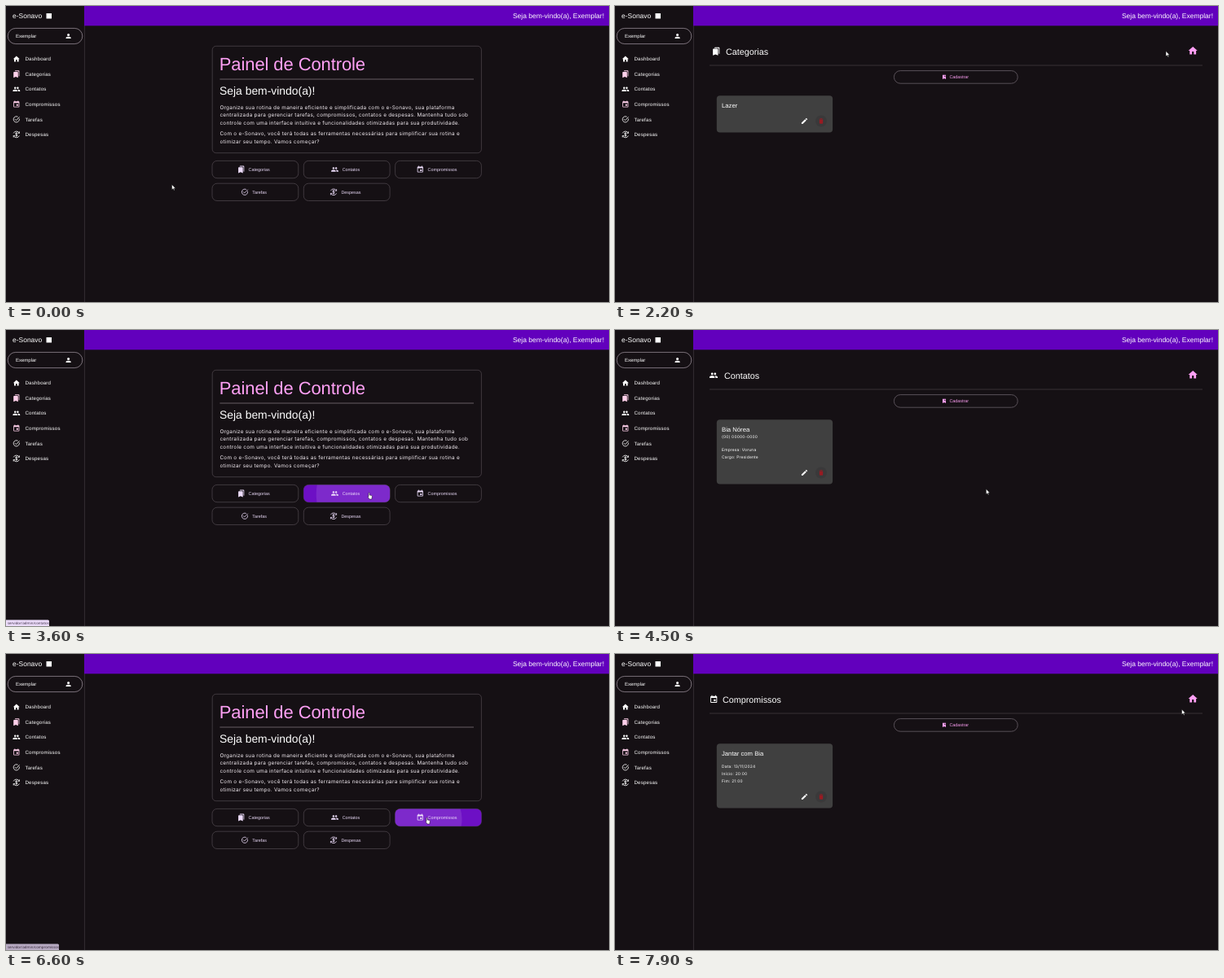
These frames come from a looping animation (740x364 px, 8 s). An HTML page:

```html
<!DOCTYPE html>
<html lang="pt-BR">
<head>
<meta charset="utf-8">
<title>Painel de Controle</title>
<style>
  html, body { margin: 0; width: 100%; height: 100%; overflow: hidden; background: #151014; }
  svg { display: block; width: 100vw; height: 100vh; }
  text { font-family: "Liberation Sans", Arial, sans-serif; text-rendering: geometricPrecision; white-space: pre; }
  .body { font-family: Inter, sans-serif; letter-spacing: .041em; }
  .menu { letter-spacing: .19px; }
  .tight { letter-spacing: -.1px; }
  .url { font-family: "Open Sans", sans-serif; }
</style>
</head>
<body>
<svg id="stage" viewBox="0 0 740 364"></svg>
<script>
const LOOP = 8000;
const WHITE = '#fff', PINK = '#ffa0f5', PALE = '#ffe0f7', LILAC = '#ecdcfa', EDGE = '#4b434a';

const ICONS = {
  home: '<path d="M10 20v-6h4v6h5v-8h3L12 3 2 12h3v8z"/>',
  books: '<path d="M19 18l2 1V3q0-2-2-2H9Q7 1 7 3h10q2 0 2 2zM15 5H5Q3 5 3 7v16l7-3 7 3V7q0-2-2-2z"/>',
  people: '<circle cx="8" cy="8" r="3"/><circle cx="16" cy="8" r="3"/>' +
    '<path d="M1 19v-2.5C1 14 6 13 8 13s7 1 7 3.500V19zM17 19v-2.500q0-2-2-3.400c3-.4 8 1 8 3.400V19z"/>',
  event: '<path fill-rule="evenodd" d="M19 3h-1V1h-2v2H8V1H6v2H5Q3 3 3 5v14q0 2 2 2h14q2 0 2-2V5q0-2-2-2zm0 16H5V8h14zm-2-7h-5v5h5z"/>',
  task: '<path fill="none" stroke="currentColor" stroke-width="2" d="M20.600 9.500A9 9 0 1 1 16.500 4.200M7 11l4 4L21.500 4.500"/>',
  money: '<path fill="none" stroke="currentColor" stroke-width="2" d="M3 8A10 10 0 0 1 21 8M21 3v5h-5M21 16A10 10 0 0 1 3 16M3 21v-5h5' +
    'M15 9q-1-1.500-3-1.500c-4 0-4 4 0 4.500s4 4.500 0 4.500q-2 0-3-1.500M12 5.500v13"/>',
  person: '<circle cx="12" cy="8" r="4"/><path d="M4 20v-2c0-3 5-4 8-4s8 1 8 4v2z"/>',
  pencil: '<path d="M3 17.200V21h3.800L17.800 9.900 14 6.200zM20.700 7a1 1 0 0 0 0-1.400l-2.300-2.300a1 1 0 0 0-1.400 0l-1.900 1.800 3.800 3.800z"/>',
  trash: '<path d="M6 19q0 2 2 2h8q2 0 2-2V7H6zM19 4h-3.500l-1-1h-5l-1 1H5v2h14z"/>',
  add: '<path fill-rule="evenodd" d="M5 3h14v18l-7-3-7 3zM14 6v2h-2v2h2v2h2v-2h2V8h-2V6z"/>'
};

const text = (x, y, size, content, fill = WHITE, cls = '', anchor = 'start') =>
  `<text x="${x}" y="${y}" font-size="${size}" fill="${fill}" class="${cls}" text-anchor="${anchor}">${content}</text>`;
const icon = (name, cx, cy, size, color = WHITE) =>
  `<g transform="translate(${cx - size / 2} ${cy - size / 2}) scale(${size / 24})" fill="${color}" color="${color}">${ICONS[name]}</g>`;
const box = (x, y, w, h, r, stroke = EDGE, fill = 'none') =>
  `<rect x="${x}" y="${y}" width="${w}" height="${h}" rx="${r}" fill="${fill}" stroke="${stroke}" stroke-width=".8"/>`;
const rule = (x1, x2, y, color) => `<path d="M${x1} ${y}H${x2}" stroke="${color}" stroke-width=".8"/>`;

const MENU = [['home', 'Dashboard'], ['books', 'Categorias'], ['people', 'Contatos'],
  ['event', 'Compromissos'], ['task', 'Tarefas'], ['money', 'Despesas']];

function frame() {
  const items = MENU.map(([name, label], i) => {
    const y = 65.2 + i * 18.55;
    const tint = name === 'books' || name === 'event' ? '#ffd0ea' : WHITE;
    return icon(name, 12.8, y, 9.6, tint) + text(23.4, y + 2.1, 6.17, label, WHITE, 'menu');
  }).join('');
  return '<rect width="740" height="364" fill="#151014"/><path d="M96.400 0V364" stroke="#3d363c" stroke-width=".8"/>' +
    '<rect x="96" width="644" height="24.300" fill="#6200bd"/>' +
    text(734, 14.9, 8.48, 'Seja bem-vindo(a), Exemplar!', WHITE, '', 'end') +
    text(8, 15, 8.48, 'e-Sonavo') + '<rect x="49.500" y="9" width="6.500" height="6.500" fill="#fff"/>' +
    box(2.2, 27.4, 91.6, 19.2, 9.6, '#958a93') + text(12, 39.1, 6, 'Exemplar') + icon('person', 76.6, 37, 9.2) + items;
}

// Left edge, top edge, icon centre, label start
const BUTTONS = [['books', 'Categorias', 253, 190.4, 288.700, 297.6], ['people', 'Contatos', 365.3, 190.4, 403.5, 412.7],
  ['event', 'Compromissos', 477.6, 190.4, 508.3, 517.6], ['task', 'Tarefas', 253, 218.2, 293, 302.3],
  ['money', 'Despesas', 365.3, 218.2, 402, 411.4]];
const BUTTON_W = 105.8, BUTTON_H = 21.3;

function dashboard() {
  const paragraphs = [
    [127, 'Organize sua rotina de maneira eficiente e simplificada com o e-Sonavo, sua plataforma'],
    [136.2, 'centralizada para gerenciar tarefas, compromissos, contatos e despesas. Mantenha tudo sob'],
    [145.5, 'controle com uma interface intuitiva e funcionalidades otimizadas para sua produtividade.'],
    [159.3, 'Com o e-Sonavo, você terá todas as ferramentas necessárias para simplificar sua rotina e'],
    [168.6, 'otimizar seu tempo. Vamos começar?']
  ].map(([y, line]) => text(262.4, y, 6.4, line, '#f4edf3', 'body')).join('');
  const buttons = BUTTONS.map(([, , x, y]) => box(x, y, BUTTON_W, BUTTON_H, 6)).join('');
  const labels = BUTTONS.map(([name, label, , y, iconX, labelX]) =>
    icon(name, iconX, y + 10.6, 9.6, LILAC) + text(labelX, y + 12.5, 5.4, label, LILAC)).join('');
  return box(253.2, 49.3, 330.2, 131.4, 4.6) + text(261.8, 78.9, 22, 'Painel de Controle', PINK, 'tight') +
    rule(262.4, 574, 90, '#7b727a') + text(262, 109.2, 13.9, 'Seja bem-vindo(a)!') + paragraphs + buttons +
    `<g id="hover"><clipPath id="clip"><rect id="clipBox" width="${BUTTON_W}" height="${BUTTON_H}" rx="6"/></clipPath>` +
    `<rect id="hoverBox" width="${BUTTON_W}" height="${BUTTON_H}" rx="6" fill="#6d10c5"/>` +
    '<circle id="ripple" fill="#fff" fill-opacity=".11" clip-path="url(#clip)"/></g>' + labels;
}

function listPage(name, title, iconX, titleX, bottom, cardTitle, lines) {
  const actionY = bottom - 14.1;
  return icon(name, iconX, 55.8, 10.9) + text(titleX, 60.4, 10.78, title) + rule(116, 721, 73, '#3f383e') +
    icon('home', 709.2, 55, 13.4, PINK) + box(342.4, 79.6, 151.8, 15.6, 7.8, '#696069') +
    icon('add', 404, 87.3, 7, PINK) + text(410.4, 89.2, 5.4, 'Cadastrar', PINK) +
    `<rect x="124.800" y="110.200" width="142.300" height="${bottom - 110.2}" rx="4" fill="#404040"/>` +
    text(131, 124.5, 7.7, cardTitle) +
    lines.map(([y, line]) => text(131, y, 4.9, line, WHITE, 'body')).join('') +
    icon('pencil', 232.5, actionY, 9.6) +
    `<circle cx="253" cy="${actionY}" r="7" fill="#3a393a"/>` + icon('trash', 253, actionY, 8.6, '#971b22');
}

const PAGES = {
  dashboard: dashboard(),
  categorias: listPage('books', 'Categorias', 124.2, 136, 155.6, 'Lazer', []),
  contatos: listPage('people', 'Contatos', 121, 134, 189.6, 'Bia Nórea',
    [[133.4, '(00) 00000-0000'], [148.9, 'Empresa: Voruna'], [158, 'Cargo: Presidente']]),
  compromissos: listPage('event', 'Compromissos', 121.2, 132, 189.6, 'Jantar com Bia',
    [[139.9, 'Data: 13/11/2024'], [149.2, 'Início: 20:00'], [158.4, 'Fim: 21:00']])
};

const $ = id => document.getElementById(id);
$('stage').innerHTML = frame() +
  Object.entries(PAGES).map(([id, markup]) => `<g id="${id}">${markup}</g>`).join('') +
  '<circle id="homeHover" cx="709.200" cy="55" r="9.800" fill="#ffa0f5" fill-opacity=".1"/>' +
  `<g id="status"><path id="statusBox" fill="${LILAC}"/><text id="statusText" class="url" x="2" y="362.300" font-size="4.400" fill="#33243c"></text></g>` +
  '<g id="cursor" fill="#fff" stroke="#000" stroke-width=".45" stroke-linejoin="round">' +
  '<path id="arrow" d="M0 0V6.500L1.600 5.100 2.600 7.300 3.600 6.900 2.600 4.700H4.600Z"/>' +
  '<path id="hand" transform="translate(-1.500 0)" d="M1 .7a.6.6 0 0 1 1.200 0V3l2.500.6q.7.2.6 1L4.800 8H2L0 5q-.1-.8 1-.2Z"/></g>';

// Time and page shown from then on
const ROUTE = [[0, 'dashboard'], [790, 'categorias'], [2550, 'dashboard'], [3680, 'contatos'],
  [5550, 'dashboard'], [6680, 'compromissos']];
// Time and cursor tip
const PATH = [[0, 203.5, 219.5], [50, 203.5, 219.5], [390, 328, 200], [1400, 329, 200], [2200, 676, 55.5], [2320, 709, 52],
  [2750, 709, 52], [3350, 445.5, 200], [3850, 445.5, 200], [3950, 447.5, 200], [4420, 447.5, 200], [5200, 709, 52],
  [5720, 709, 52], [6290, 516.5, 201], [7400, 516.5, 201], [7900, 695.5, 68], [8000, 695.5, 68]];
// Button index, hover start, click, end
const PRESSES = [[0, 300, 690, 790], [1, 3260, 3508, 3680], [2, 6230, 6537, 6680]];
const HOME_HOVERS = [[2260, 2550], [5130, 5550]];
// Page in the address, box width, fade-in start, fade-out start
const STATUS = [['categorias', 57, 300, 1200], ['dashboard', 57, 2350, 2850], ['contatos', 53, 3330, 3950],
  ['dashboard', 57, 5250, 6150], ['compromissos', 65, 6510, 7200]];

const clamp = v => Math.min(1, Math.max(0, v));
const smooth = p => p * p * (3 - 2 * p);
const show = (id, on) => $(id).setAttribute('display', on ? 'inline' : 'none');
const set = (id, attrs) => { for (const key in attrs) $(id).setAttribute(key, attrs[key]); };

function cursorAt(t) {
  const i = Math.max(1, PATH.findIndex(point => point[0] > t));
  const [t0, x0, y0] = PATH[i - 1], [t1, x1, y1] = PATH[i];
  const p = smooth((t - t0) / (t1 - t0));
  return [x0 + (x1 - x0) * p, y0 + (y1 - y0) * p];
}

function render(t) {
  const page = ROUTE.filter(([start]) => start <= t).pop()[1];
  Object.keys(PAGES).forEach(id => show(id, id === page));
  const [x, y] = cursorAt(t);

  const press = PRESSES.find(([, start, , end]) => t >= start && t < end);
  show('hover', press);
  if (press) {
    const [, , bx, by] = BUTTONS[press[0]];
    set('hoverBox', { x: bx, y: by });
    set('clipBox', { x: bx, y: by });
    const reach = Math.max(x - bx, bx + BUTTON_W - x) + 1;
    const p = clamp((t - press[2]) / 225);
    set('ripple', { cx: x, cy: y + 2, r: reach * (1 - (1 - p) ** 3) });
  }

  const onHome = HOME_HOVERS.some(([start, end]) => t >= start && t < end);
  show('homeHover', onHome);

  const link = STATUS.find(([, , start, end]) => t >= start && t < end + 250);
  show('status', link);
  if (link) {
    const [name, width, start, end] = link;
    set('status', { opacity: clamp((t - start) / 120) * clamp((end + 250 - t) / 250) });
    set('statusBox', { d: `M0 356.600H${width - 1.5}q1.500 0 1.500 1.500V364H0Z` });
    $('statusText').textContent = 'servidor/admin/' + name;
  }

  set('cursor', { transform: `translate(${x} ${y})` });
  const pointing = Boolean(press) || onHome;
  show('hand', pointing);
  show('arrow', !pointing);
}

const begin = performance.now();
function tick() {
  render((performance.now() - begin) % LOOP);
  requestAnimationFrame(tick);
}
tick();
</script>
</body>
</html>
```
